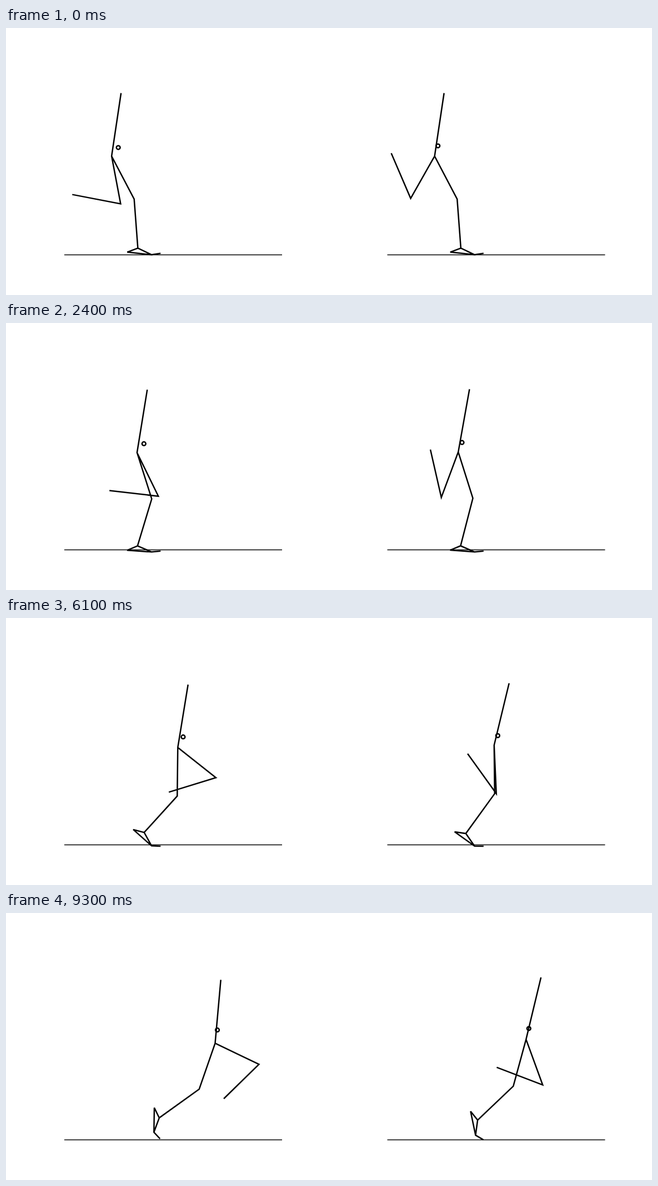
Write an HTML page that moves like this. It is 1163x482 px and loops after 9.4 s.

```html
<!DOCTYPE html>
<html lang="en">
<head>
<meta charset="utf-8">
<title>Leg swing comparison</title>
<style>
  html, body { margin: 0; width: 100%; height: 100%; overflow: hidden; background: #fff; }
  svg { display: block; width: 100%; height: 100%; }
  path, circle { fill: none; stroke: #000; stroke-width: 2.5; }
  .ground { stroke-width: 1.4; }
</style>
</head>
<body>
<svg viewBox="0 0 1163 482">
  <g>
    <path class="ground" d="M105 409.5H497"/>
    <path class="body"/>
    <circle r="3.4"/>
  </g>
  <g transform="translate(581.5)">
    <path class="ground" d="M105 409.5H497"/>
    <path class="body"/>
    <circle r="3.4"/>
  </g>
</svg>
<script>
const LOOP = 9400, STEP = 100;
const LEN = { toe: 16.2, foot: 27.6, heel: 44.2, shank: 88.7, thigh: 87.6, trunk: 115.1 };

// Smooth polynomial through evenly spaced values, u from 0 to 1
const curve = (...values) => u => {
  const x = u * (values.length - 1);
  return values.reduce((sum, v, i) =>
    sum + values.reduce((w, _, j) => j === i ? w : w * (x - j) / (i - j), v), 0);
};

// Angles in degrees: stance leg and trunk from straight up, swing leg from
// straight down. mass is measured from the hip, curl is the final toe bend.
const WALKERS = [
  {
    curl: 44,
    foot: curve(-64.4, -67, -49.8, -14.3, 20.3),
    shank: curve(-4.3, 16.1, 34, 46, 54.2),
    thigh: curve(-27.6, -6.9, 19.1),
    trunk: curve(8.5, 9.4, 9.2, 5.1),
    swingThigh: curve(10.7, 31, 52.2, 64.3),
    swingShank: curve(-100.9, -93.4, -72, -45.6),
    massX: curve(12, 11.2, 4),
    massY: curve(-15.5, -17.6, -24)
  },
  {
    curl: 27,
    foot: curve(-64.4, -66.6, -52, -22.9, 7.7),
    shank: curve(-4.3, 13.9, 28.9, 39.2, 46.4),
    thigh: curve(-27.6, -7.4, 15.2),
    trunk: curve(8.5, 10.8, 13.6, 13.5),
    swingThigh: curve(-29.5, -16.5, 3.2, 20),
    swingShank: curve(-156.8, -165.7, -143.4, -111),
    massX: curve(6, 6.8, 5),
    massY: curve(-18.5, -16.8, -19.6)
  }
];

const rad = deg => deg * Math.PI / 180;

// Point at a distance from another, angle clockwise from straight up
const ray = ([x, y], deg, len) =>
  [x + len * Math.sin(rad(deg)), y - len * Math.cos(rad(deg))];

const line = (...pts) =>
  "M" + pts.map(p => p.map(n => n.toFixed(2)).join(" ")).join("L");

function draw(w, group, u) {
  // The toe presses down early and peels off late
  const toe = 9 - 12 * u - w.curl * u ** 6;
  const tip = [
    275.3 + 3 * Math.cos(rad(toe)),
    412 - 5.2 * (1 - u) ** 9 - w.curl / 10 * u ** 12
  ];
  const ball = ray(tip, toe * -1 - 90, LEN.toe);
  const ankle = ray(ball, w.foot(u), LEN.foot);
  const heel = ray(ball, w.foot(u) - 19.4, LEN.heel);
  const knee = ray(ankle, w.shank(u), LEN.shank);
  const hip = ray(knee, w.thigh(u), LEN.thigh);
  const top = ray(hip, w.trunk(u), LEN.trunk);
  const swingKnee = ray(hip, 180 - w.swingThigh(u), LEN.thigh);
  const swingAnkle = ray(swingKnee, 180 - w.swingShank(u), LEN.shank);

  group.querySelector(".body").setAttribute("d",
    line(top, hip, knee, ankle, heel, ball, tip) +
    line(ankle, ball) +
    line(hip, swingKnee, swingAnkle));
  const dot = group.querySelector("circle");
  dot.setAttribute("cx", hip[0] + w.massX(u));
  dot.setAttribute("cy", hip[1] + w.massY(u));
}

const groups = document.querySelectorAll("g");
const start = performance.now();

function render(now) {
  const t = Math.floor(Math.max(0, now - start) % LOOP / STEP) * STEP;
  WALKERS.forEach((w, i) => draw(w, groups[i], t / (LOOP - STEP)));
  requestAnimationFrame(render);
}
render(start);
</script>
</body>
</html>
```
